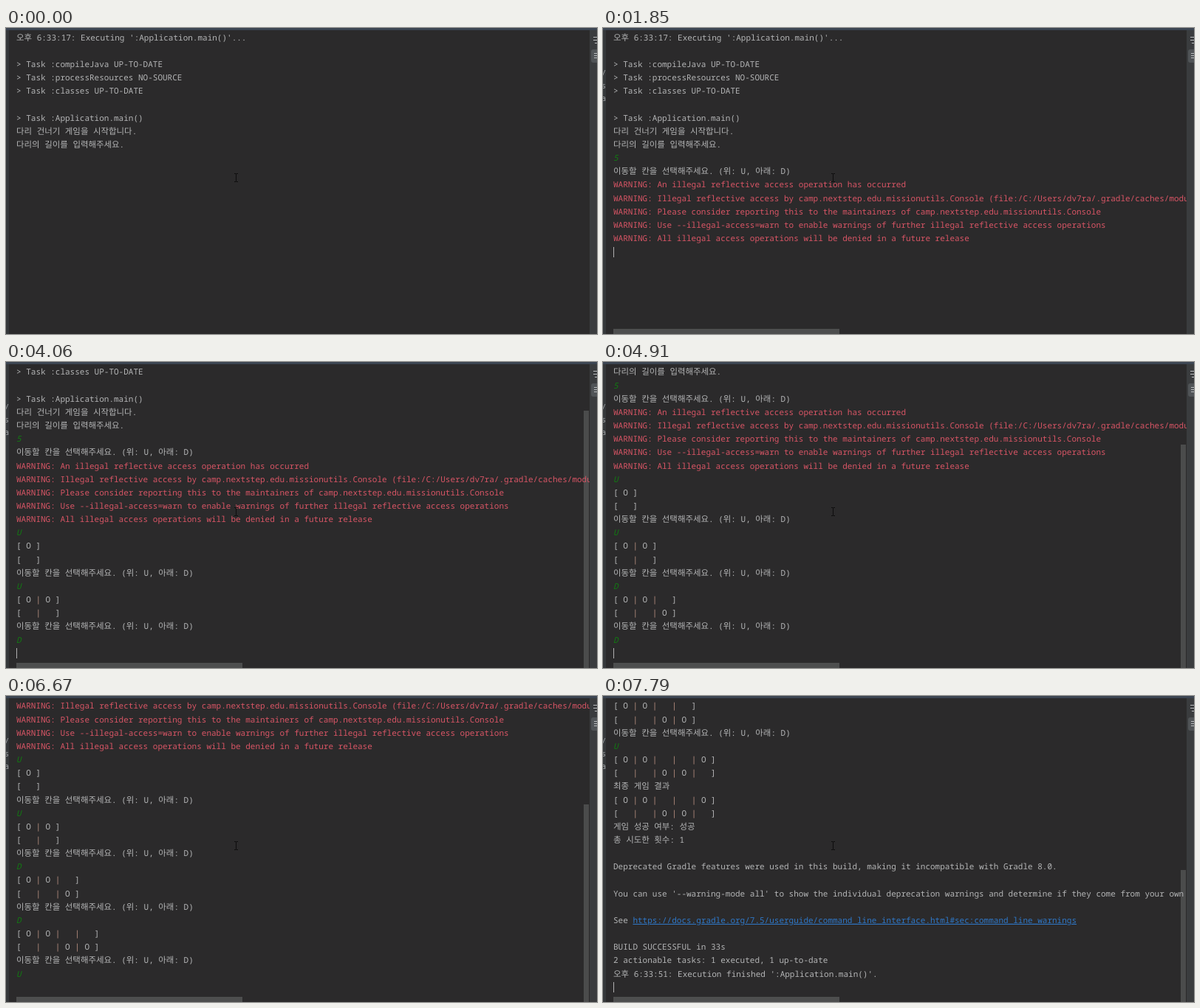
Recreate the animation shown at these times as an HTML page. Size 800x415 px, loop 7.85 s.

```html
<!DOCTYPE html>
<html lang="ko">
<head>
<meta charset="utf-8">
<title>Console</title>
<style>
  html, body { margin: 0; width: 100%; height: 100%; overflow: hidden; background: #2b2a2b; }
  #stage { position: relative; width: 800px; height: 415px; overflow: hidden; background: #2b2a2b; }
  #stage div, #stage svg { position: absolute; }
  #view { left: 4px; top: 4px; width: 786px; height: 411px; overflow: hidden; }
  #text { left: 10px; top: 0; }
  #text .line {
    left: 0; height: 18.16px; line-height: 18.16px; white-space: pre; color: #b4b5b6;
    font-family: "Noto Sans Mono", "Noto Sans CJK KR", "Noto Sans CJK", monospace;
    font-size: 11px; font-weight: 500;
    text-rendering: geometricPrecision; font-variant-ligatures: none;
  }
  #text .ko {
    font-family: "Noto Sans CJK KR", "Noto Sans CJK", sans-serif;
    font-size: 11.45px; font-weight: 400; line-height: 0;
  }
  #text .err { color: #d85565; }
  #text .in { color: #127a12; font-style: italic; }
  #text .bar { color: #bb9182; }
  #text .link { color: #2f78c8; text-decoration: underline; }
  #caret { width: 1px; height: 14px; background: #b0b0b0; }
  #vbar { left: 782px; bottom: 0; width: 7px; background: #4b4c4c; }
  #hbar { left: 14px; top: 408px; width: 306px; height: 7px; background: #4d4e4e; }
  #edge { left: 0; top: 0; width: 4px; height: 415px; background: #35383a; overflow: hidden; }
  #marks { left: 0; top: 0; color: #a0a2a4; font: 10px/16px "DejaVu Sans Mono", monospace; }
  #marks div { left: -2px; }
  #top { left: 0; top: 0; width: 800px; height: 3px; background: #3c4552; }
  #side { left: 790px; top: 3px; }
</style>
</head>
<body>
<div id="stage">
  <div id="vbar"></div>
  <div id="hbar"></div>
  <div id="view"><div id="text"></div></div>
  <div id="caret"></div>
  <div id="edge"><div id="marks">
    <div style="top:54px">/</div><div style="top:71px">s</div><div style="top:88px">a</div>
  </div></div>
  <div id="top"></div>
  <svg id="side" width="10" height="412">
    <rect width="10" height="412" fill="#3a3c3e"/>
    <rect x="2" y="26" width="12" height="18" rx="3" fill="#505457"/>
    <path d="M5 9.5h5M5 13.5h5M7 17.5h3M6 31.5h4M6 34.5h4M6 37.5h4" stroke="#b9bcbe" fill="none"/>
  </svg>
  <svg style="left:307px;top:196px" width="9" height="14">
    <path d="M2 1.5h2l.5 .5 .5-.5h2M4.5 2v10M2 12.5h2l.5-.5 .5 .5h2" stroke="#0c0c0c" fill="none"/>
  </svg>
</div>
<script>
const LOOP = 7850, PITCH = 18.16, CELL = 6.6, ROWS = 22, BLINK = 116;
const $ = id => document.getElementById(id);

const ask = "이동할 칸을 선택해주세요. (위: U, 아래: D)";
const side = (moves, key) =>
  "[ " + [...moves].map(m => m === key ? "O" : " ").join(" | ") + " ]";
const bridge = moves => [side(moves, "U"), side(moves, "D")];
const input = s => ({ s, cls: "in" });
const warn = s => ({ s: "WARNING: " + s, cls: "err" });

const lines = [
  "오후 6:33:17: Executing ':Application.main()'...",
  "",
  "> Task :compileJava UP-TO-DATE",
  "> Task :processResources NO-SOURCE",
  "> Task :classes UP-TO-DATE",
  "",
  "> Task :Application.main()",
  "다리 건너기 게임을 시작합니다.",
  "다리의 길이를 입력해주세요.",
  input("5"), ask,
  warn("An illegal reflective access operation has occurred"),
  warn("Illegal reflective access by camp.nextstep.edu.missionutils.Console (file:/C:/Users/dv7ra/.gradle/caches/modules-2"),
  warn("Please consider reporting this to the maintainers of camp.nextstep.edu.missionutils.Console"),
  warn("Use --illegal-access=warn to enable warnings of further illegal reflective access operations"),
  warn("All illegal access operations will be denied in a future release"),
  input("U"), ...bridge("U"), ask,
  input("U"), ...bridge("UU"), ask,
  input("D"), ...bridge("UUD"), ask,
  input("D"), ...bridge("UUDD"), ask,
  input("U"), ...bridge("UUDDU"),
  "최종 게임 결과", ...bridge("UUDDU"),
  "게임 성공 여부: 성공",
  "총 시도한 횟수: 1",
  "",
  "Deprecated Gradle features were used in this build, making it incompatible with Gradle 8.0.",
  "",
  "You can use '--warning-mode all' to show the individual deprecation warnings and determine if they come from your own",
  "",
  "See https://docs.gradle.org/7.5/userguide/command_line_interface.html#sec:command_line_warnings",
  "",
  "BUILD SUCCESSFUL in 33s",
  "2 actionable tasks: 1 executed, 1 up-to-date",
  "오후 6:33:51: Execution finished ':Application.main()'."
];

// [time, finished lines]; a half means the next input is typed but not entered
const steps = [
  [-BLINK, 9], [800, 9.5], [1250, 10], [1760, 16],
  [2120, 16.5], [2270, 17], [2600, 20],
  [2950, 20.5], [3120, 21], [3300, 24],
  [3870, 24.5], [4020, 25], [4350, 28],
  [4700, 28.5], [4850, 29], [5150, 32],
  [6260, 32.5], [6500, 33], [6880, 40], [7080, 50]
];

const mark = s => s
  .replace(/[가-힣]+/g, '<span class="ko">$&</span>')
  .replace(/\|/g, '<span class="bar">|</span>')
  .replace(/https:\S+/, '<span class="link">$&</span>');

const rows = lines.map((line, i) => {
  const { s, cls = "" } = typeof line === "string" ? { s: line } : line;
  const el = document.createElement("div");
  el.className = "line " + cls;
  el.style.top = i * PITCH + "px";
  el.innerHTML = mark(s);
  $("text").append(el);
  return el;
});

const show = (el, on) => { el.style.visibility = on ? "visible" : "hidden"; };

function draw(t) {
  const [since, pos] = steps.filter(s => s[0] <= t).pop();
  const done = Math.floor(pos), typed = pos > done;
  const first = Math.max(0, done + 1 - ROWS);
  const top = first ? 5.4 : 4.7;

  rows.forEach((el, i) => show(el, i >= first && i < Math.ceil(pos)));
  $("text").style.top = top - 4 - first * PITCH + "px";

  const caret = $("caret");
  caret.style.left = Math.floor(14 + (typed ? CELL : 0)) + "px";
  caret.style.top = Math.round(top + (done - first) * PITCH + 1.5) + "px";
  show(caret, Math.floor((t - since) / BLINK) % 2 === 0);

  const bar = $("vbar");
  bar.style.top = Math.round(3 + first / (done + 1) * 409) + "px";
  show(bar, first > 0);
  show($("hbar"), done >= 16);
  show($("marks"), t >= 1000);
}

function tick() {
  draw(performance.now() % LOOP);
  requestAnimationFrame(tick);
}
tick();
</script>
</body>
</html>
```
